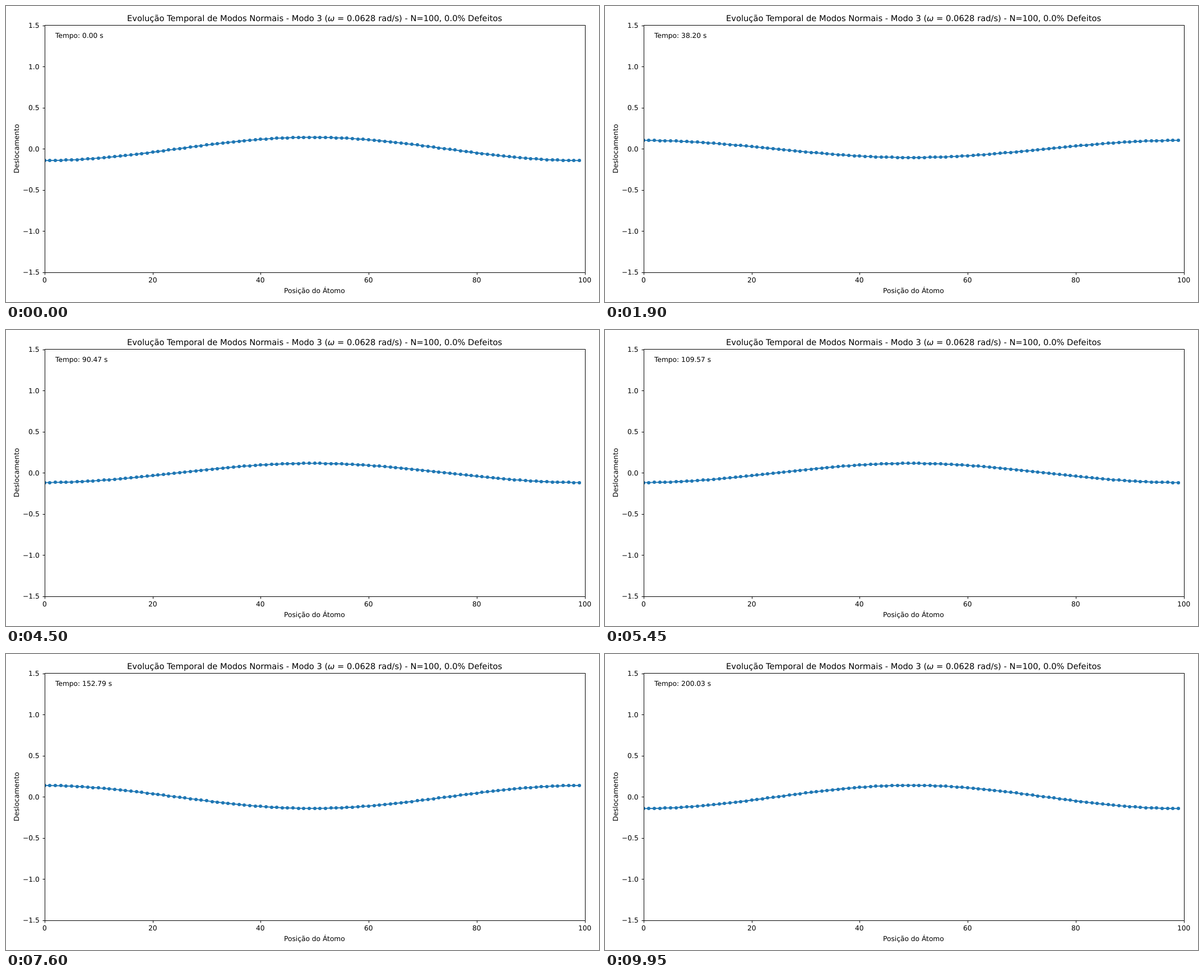
These frames come from a looping animation (1058 by 529 pixels, 10 s). An HTML page with a canvas:

```html
<!DOCTYPE html>
<html lang="pt">
<head>
<meta charset="utf-8">
<title>Modos Normais</title>
<style>
html, body { margin: 0; width: 100%; height: 100%; overflow: hidden; background: #fff; }
canvas { display: block; }
</style>
</head>
<body>
<canvas id="plot" width="1058" height="529"></canvas>
<script>
const ctx = document.getElementById('plot').getContext('2d');
const POINT = 1058 / 864;              // pixels per typographic point
const LEFT = 68.75, TOP = 34.98, WIDTH = 963.8, HEIGHT = 441;
const ATOMS = 100, FRAMES = 200, FRAME_MS = 50;
const OMEGA = 2 * Math.sin(Math.PI / ATOMS);
const DURATION = 4 * Math.PI / OMEGA;  // two periods
const AMPLITUDE = Math.sqrt(2 / ATOMS);
const BLUE = '#1f77b4';

const toX = x => LEFT + x / 100 * WIDTH;
const toY = y => TOP + (1.5 - y) / 3 * HEIGHT;
const font = (points, style = '') => `${style} ${points * POINT}px "DejaVu Sans", sans-serif`;

// align: 0 = left, 0.5 = centre, 1 = right
function label(text, x, y, align) {
  ctx.font = font(10);
  ctx.fillText(text, Math.round(x - align * ctx.measureText(text).width), y);
}

function line(x1, y1, x2, y2) {
  ctx.beginPath();
  ctx.moveTo(x1, y1);
  ctx.lineTo(x2, y2);
  ctx.stroke();
}

function drawTitle() {
  const parts = [
    ['Evolução Temporal de Modos Normais - Modo 3 (', font(12)],
    ['ω', font(12, 'italic')],
    [' = 0.0628 rad/s) - N=100, 0.0% Defeitos', font(12)]
  ];
  const widths = parts.map(([text, face]) => {
    ctx.font = face;
    return ctx.measureText(text).width;
  });
  let x = Math.round(toX(50) - widths.reduce((a, b) => a + b) / 2);
  parts.forEach(([text, face], i) => {
    ctx.font = face;
    ctx.fillText(text, x, 27);
    x += widths[i];
  });
}

function drawAxes() {
  ctx.fillStyle = ctx.strokeStyle = '#000';
  ctx.lineWidth = 0.8 * POINT;
  ctx.strokeRect(69.5, 34.5, 964, 442);
  for (let x = 0; x <= 100; x += 20) {
    const tick = Math.round(toX(x)) + 0.5;
    line(tick, 477, tick, 480.5);
    label(String(x), toX(x), 494, 0.5);
  }
  for (let y = -1.5; y <= 1.5; y += 0.5) {
    const tick = Math.round(toY(y)) + 0.5;
    line(65.5, tick, 69, tick);
    label(y.toFixed(1).replace('-', '\u2212'), LEFT - 7.5 * POINT, Math.round(toY(y) + 4.35), 1);
  }
  label('Posição do Átomo', toX(50), 513, 0.5);
  ctx.save();
  ctx.translate(23, 255);
  ctx.rotate(-Math.PI / 2);
  label('Deslocamento', 0, 0, 0.5);
  ctx.restore();
  drawTitle();
}

function drawChain(time) {
  const swing = -AMPLITUDE * Math.cos(OMEGA * time);
  const points = Array.from({ length: ATOMS }, (_, i) =>
    [toX(i), toY(swing * Math.cos(2 * Math.PI * (i + 0.5) / ATOMS))]);

  ctx.save();
  ctx.beginPath();
  ctx.rect(69, 35, 964, 441);
  ctx.clip();
  ctx.strokeStyle = ctx.fillStyle = BLUE;
  ctx.lineWidth = 1.5 * POINT;
  ctx.lineJoin = 'round';
  ctx.beginPath();
  points.forEach(([x, y]) => ctx.lineTo(x, y));
  ctx.stroke();
  // Markers sit on whole pixels, the line does not.
  for (const [x, y] of points) {
    ctx.beginPath();
    ctx.arc(Math.round(x), Math.round(y), 2.5 * POINT, 0, 2 * Math.PI);
    ctx.fill();
  }
  ctx.restore();
}

const start = performance.now();
ctx.textRendering = 'geometricPrecision';

function draw() {
  const frame = Math.floor((performance.now() - start) / FRAME_MS) % FRAMES;
  const time = frame / (FRAMES - 1) * DURATION;
  ctx.fillStyle = '#fff';
  ctx.fillRect(0, 0, 1058, 529);
  drawChain(time);
  drawAxes();
  label(`Tempo: ${time.toFixed(2)} s`, toX(2), 57, 0);
  requestAnimationFrame(draw);
}
draw();
</script>
</body>
</html>
```
